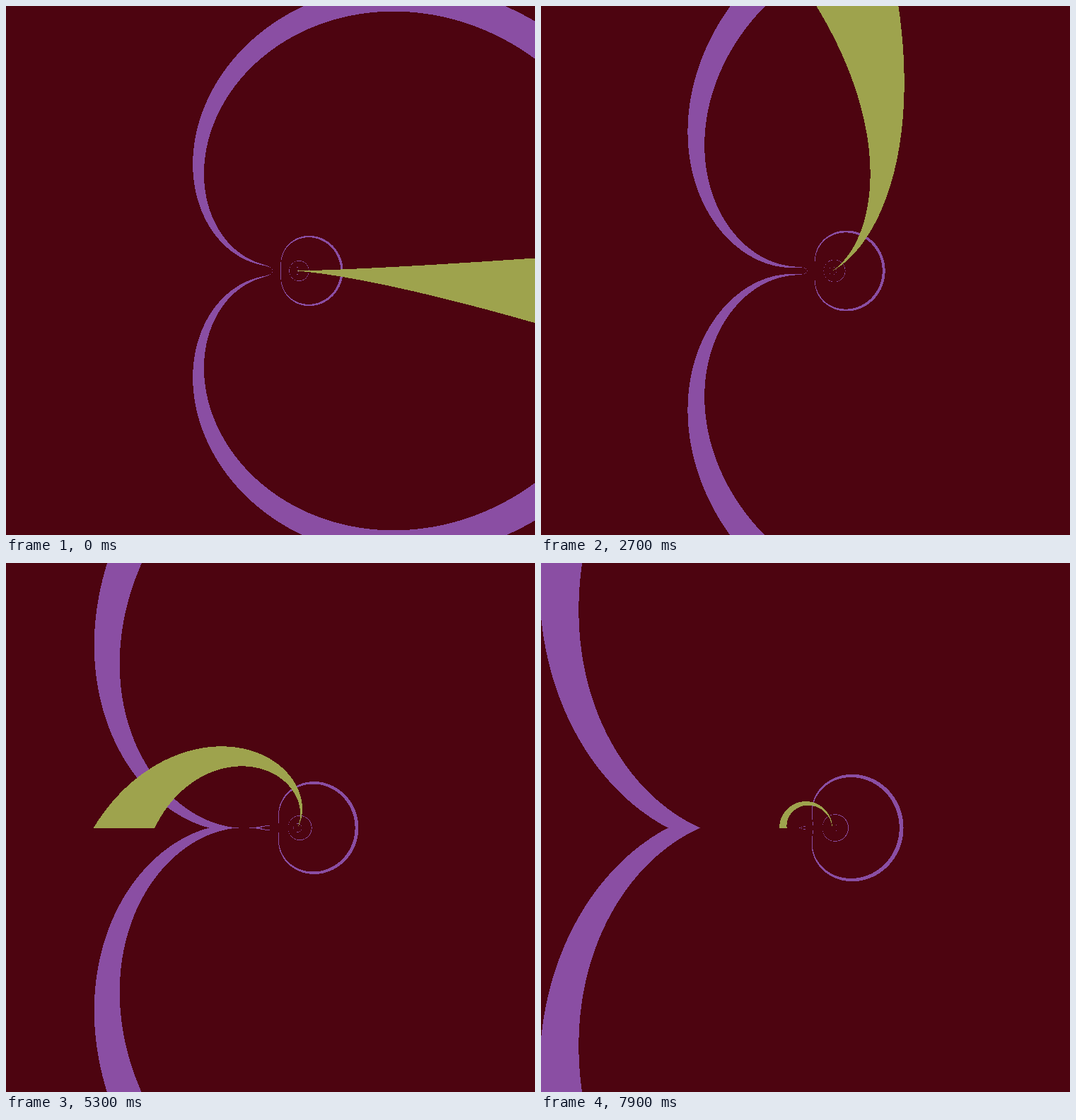
Write an HTML page with a canvas that moves like this. It is 748 px wide and 748 px high and loops after 8000 ms.

```html
<!DOCTYPE html>
<html lang="en">
<head>
<meta charset="utf-8">
<title>Log of log</title>
<style>
html, body { margin: 0; width: 100%; height: 100%; overflow: hidden; background: #4d0410; }
canvas { display: block; width: 100%; height: 100%; }
</style>
</head>
<body>
<canvas id="stage" width="748" height="748"></canvas>
<script>
const SIZE = 748, HALF = SIZE / 2, UNIT = SIZE / 20;
const STEP = 100, STEPS = 80, TURN = 300;
const RING = 1 / 30, WEDGE = 1 / 60;

const ctx = document.getElementById('stage').getContext('2d');
const image = ctx.createImageData(SIZE, SIZE);
const pixels = new Uint32Array(image.data.buffer);
const rgb = (r, g, b) => (255 << 24 | b << 16 | g << 8 | r) >>> 0;
const BACK = rgb(77, 4, 16), PURPLE = rgb(138, 78, 163), GREEN = rgb(158, 163, 77);

// For each point z, keep log(log z): its real part, and its angle in turns.
const depth = new Float64Array(SIZE * SIZE);
const angle = new Float64Array(SIZE * SIZE);
for (let j = 0, k = 0; j < SIZE; j++) {
  const y = (HALF - j) / UNIT;
  for (let i = 0; i < SIZE; i++, k++) {
    const x = (i - HALF) / UNIT;
    const u = Math.log(Math.hypot(x, y)), v = Math.atan2(y, x);
    depth[k] = Math.log(Math.hypot(u, v));
    angle[k] = Math.atan2(v, u) / (2 * Math.PI);
  }
}

// True when a value lies within `width` below `edge`, modulo 1.
function inBand(edge, value, width) {
  const d = edge - value;
  return d - Math.floor(d) < width;
}

function draw(step) {
  const edge = (step + 1) / TURN;
  for (let k = 0; k < pixels.length; k++) {
    pixels[k] = inBand(edge, angle[k], WEDGE) ? GREEN
      : inBand(edge, depth[k], RING) ? PURPLE : BACK;
  }
  ctx.putImageData(image, 0, 0);
}

let start = null, shown = 0;
function tick(now) {
  if (start === null) start = now;
  const step = Math.floor(Math.max(0, now - start) / STEP) % STEPS;
  if (step !== shown) draw(shown = step);
  requestAnimationFrame(tick);
}
draw(0);
requestAnimationFrame(tick);
</script>
</body>
</html>
```
